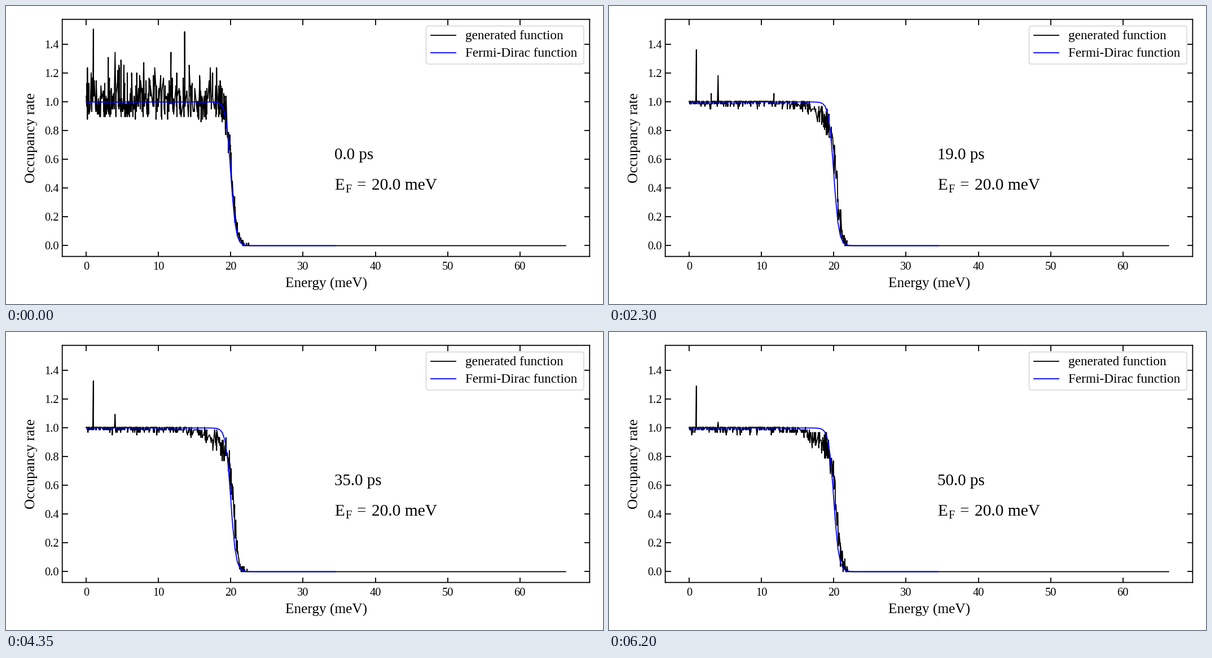
Write a matplotlib script that moves like this. It is 1058 px wide and 529 px high and loops after 6250 ms.

```python
import numpy as np
import matplotlib.pyplot as plt
from matplotlib.animation import FuncAnimation
from matplotlib.patches import FancyBboxPatch

W, H, DPI = 1058, 529, 64
PX = 72 / DPI
FRAMES, INTERVAL = 125, 50
E_F, KT, E_MAX = 20.0, 0.345, 66.33
FULL = 56                # particles in a filled state
QUANTUM = 1.005 / FULL

# Two long-lived spikes: energy, excess particles, lifetime in frames, stretch
SPIKES = [(0.95, 28, 395, 0.5), (4.0, 19, 65, 1.2)]


def fermi(e, mu, kt):
    return 1 / (1 + np.exp(np.clip((e - mu) / kt, -60, 60)))


def relaxed(e):
    """Mean occupancy of the relaxed gas: a sharp edge with a soft shoulder."""
    holes = 0.009 + 0.2 * np.exp(-np.maximum(19.8 - e, 0) / 2)
    return fermi(e, 20.45, 0.3) * (1 - holes)


def simulate():
    """Return state energies and one occupancy row per frame."""
    rng = np.random.default_rng(12)
    energy = np.sort(rng.uniform(0, 24, 520))
    energy[0] = 0
    slots = [int(np.argmin(abs(energy - spike[0]))) for spike in SPIKES]
    size = energy.size

    # The gas starts noisy, then each state relaxes at its own pace
    mean = relaxed(energy)
    edge = fermi(energy, 20.1, 0.4)
    noise = rng.gamma(6, 0.034, size) - 0.2
    start = np.round(FULL * np.maximum(edge + noise * np.sqrt(edge), 0))
    tau = rng.uniform(4, 10, size)
    tau += rng.uniform(0, 2, size) * np.maximum(start - FULL - 8, 0)

    gas = rng.binomial(FULL, mean)
    rows = []
    for k in range(FRAMES):
        redraw = rng.random(size) < 0.4
        gas = np.where(redraw, rng.binomial(FULL, mean), gas)
        n = gas + np.trunc((start - gas) * np.exp(-k / tau))
        for i, (_, excess, life, stretch) in zip(slots, SPIKES):
            n[i] = FULL + np.round(excess * np.exp(-(k / life) ** stretch))
        rows.append(np.append(n * QUANTUM, 0))
    return np.append(energy, E_MAX), rows


plt.rcParams["font.family"] = "Liberation Serif"
fig = plt.figure(figsize=(W / DPI, H / DPI), dpi=DPI, facecolor="white")


def label(x, y, text, size, **kw):
    return fig.text(x / W, 1 - y / H, text, fontsize=size * PX,
                    va="baseline", **kw)


# Plot area
left, right, top, bottom = 99.7, 1034.3, 23.7, 444.6
ax = fig.add_axes([left / W, 1 - bottom / H, (right - left) / W, (bottom - top) / H])
ax.set_xlim(-0.05 * E_MAX, 1.05 * E_MAX)
ax.set_ylim(-0.075, 1.575)
ax.set_xticks(range(0, 61, 10))
ax.set_yticks(np.arange(8) * 0.2)
ax.tick_params(direction="in", top=True, right=True, length=9.5 * PX,
               width=1.8 * PX, labelsize=20.5 * PX)
ax.tick_params(axis="x", pad=9 * PX)
ax.tick_params(axis="y", pad=5.5 * PX)
for spine in ax.spines.values():
    spine.set_linewidth(1.8 * PX)
    spine.set_snap(False)

energies, occupancy = simulate()
grid = np.linspace(0, 34.5, 100)
curve, = ax.plot(energies, occupancy[0], color="black", lw=1.8 * PX)
ax.plot(grid, fermi(grid, E_F, KT), color="blue", lw=1.8 * PX)

label(567.5, 500, "Energy (meV)", 25.3, ha="center")
label(51, 234.5, "Occupancy rate", 25.6, ha="center", rotation=90,
      rotation_mode="anchor")

# Legend, in pixel coordinates
stage = fig.add_axes([0, 0, 1, 1])
stage.set_xlim(0, W)
stage.set_ylim(H, 0)
stage.axis("off")
stage.add_patch(FancyBboxPatch((744.5, 35.5), 279.5, 67.5,
                               boxstyle="round,pad=0,rounding_size=4",
                               fc="white", ec="0.8", lw=1.2 * PX))
for y, color, name in [(52, "black", "generated function"),
                       (83, "blue", "Fermi-Dirac function")]:
    stage.plot([753, 797], [y, y], color=color, lw=1.8 * PX)
    label(814.5, y + 7, name, 23.3)

# Readouts
clock = label(582.5, 272, "", 29)
label(582.5, 326, "E", 29)
label(601.5, 331, "F", 20.5)
label(621.5, 326, "=", 29)
label(648.5, 326, f"{E_F:.1f} meV", 29.4)


def update(k):
    curve.set_ydata(occupancy[k])
    clock.set_text(f"{-(-2 * k // 5):.1f} ps")
    return curve, clock


anim = FuncAnimation(fig, update, frames=FRAMES, interval=INTERVAL,
                     repeat=True, repeat_delay=0, blit=False)
plt.show()
```
